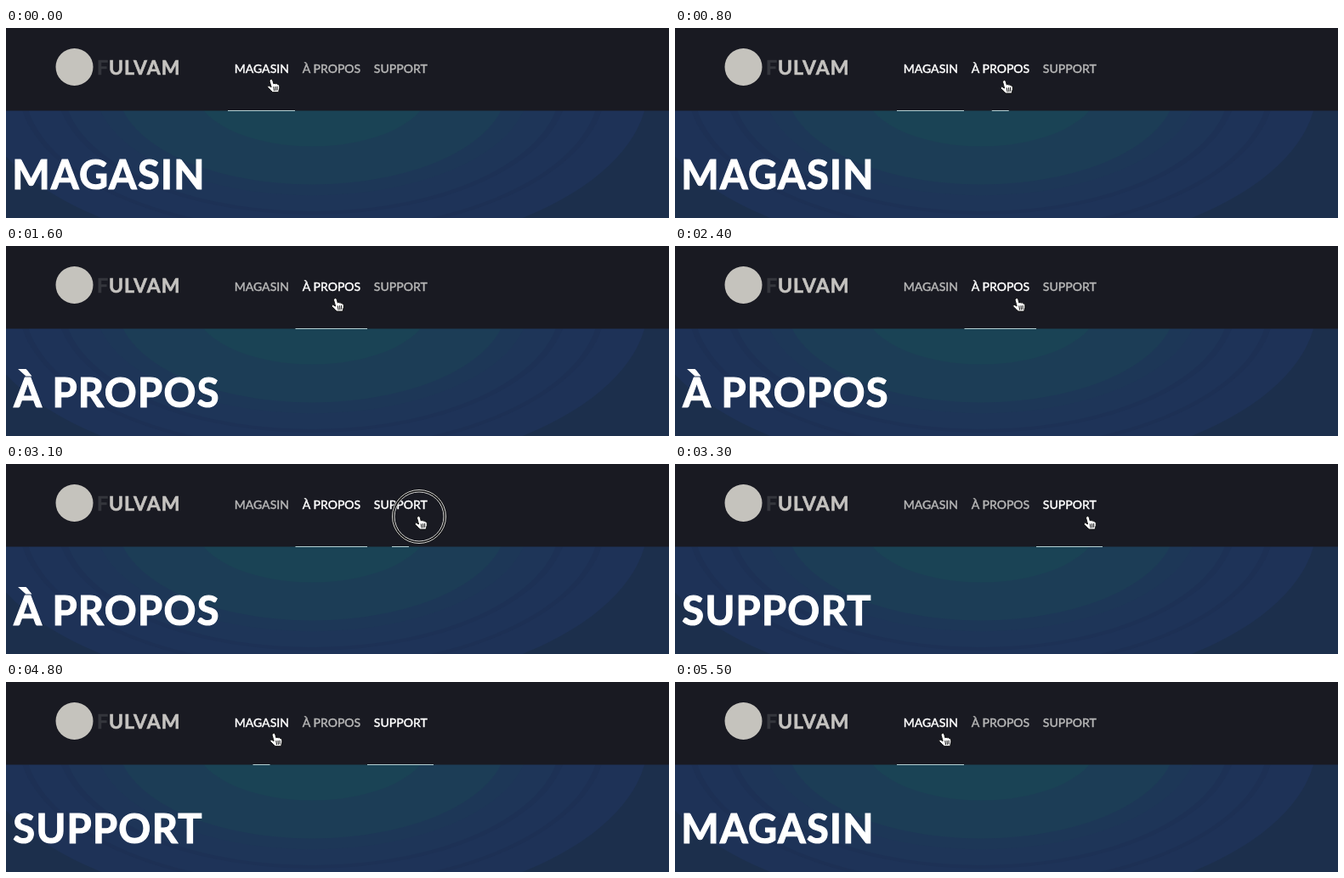
An HTML page that plays this animation: 780 by 224 pixels, repeating every 7 s.

```html
<!DOCTYPE html>
<html lang="fr">
<head>
<meta charset="utf-8">
<title>Navigation</title>
<style>
html, body { margin: 0; width: 100%; height: 100%; overflow: hidden; background: #191a22; }
svg { display: block; width: 780px; height: 224px; font-family: Lato, "Open Sans", sans-serif; }
.brand { font-size: 23px; font-weight: 700; letter-spacing: 1px; stroke-width: .6px; }
.tab { font-size: 14px; font-weight: 500; text-anchor: middle; stroke-width: .35px; }
#title { font-size: 47px; font-weight: 700; letter-spacing: 1.3px; fill: #fff; stroke: #fff; stroke-width: 1.2px; }
</style>
</head>
<body>
<svg viewBox="0 0 780 224">
  <rect width="780" height="224" fill="#1c2f4c"/>
  <g id="glow"></g>
  <rect width="780" height="97.5" fill="#191a22"/>
  <circle cx="80.5" cy="46" r="22" fill="#c5c3bd"/>
  <text class="brand" x="107" y="55" fill="#34363c" stroke="#34363c">F</text>
  <text class="brand" x="121" y="55" fill="#c5c3c0" stroke="#c5c3c0">ULVAM</text>
  <g id="tabs"></g>
  <text id="title" y="189.7"></text>
  <g id="ring" fill="none">
    <circle stroke="#111" stroke-width="4"/>
    <circle stroke="#d5d5d5"/>
    <circle stroke="#d5d5d5"/>
  </g>
  <g id="cursor" stroke="#111" stroke-linejoin="round" stroke-linecap="round">
    <path fill="#fff" d="M-2.4 1.2Q-1.9-.9-.2-.5Q1 0 1.4 1.6L2.3 5Q3.6 3.8 4.7 5.1Q6.2 4.3 7 5.8Q8.8 5.4 9.2 7.4Q9.8 10.5 8.6 12.6L8.2 15H1.2L-1 12.8L-4.6 9.4Q-5.4 7.4-3.4 7.3L-.7 8.8Z"/>
    <path fill="none" d="M2.3 8.8L3 13M4.5 8.6L4.9 12.8M6.6 8.4L6.7 12.4"/>
  </g>
</svg>
<script>
const LOOP = 7000, STEP = 100;
const $ = id => document.getElementById(id);

// line: underline width over time as [ms, px]
const tabs = [
  { name: 'MAGASIN', left: 261, width: 79, titleX: 7.3,
    line: [[1400, 79], [1600, 0], [4600, 0], [4800, 20], [5200, 20], [5500, 79]] },
  { name: 'À PROPOS', left: 340.5, width: 84.5, titleX: 9.3,
    line: [[500, 0], [700, 20], [1400, 20], [1600, 84.5], [3100, 84.5], [3300, 0], [4500, 0], [4600, 8], [4700, 0]] },
  { name: 'SUPPORT', left: 425, width: 78, titleX: 8.3,
    line: [[2400, 0], [2600, 20], [3100, 20], [3300, 78], [5200, 78], [5500, 0]] }
];
const moves = [
  { from: 400, to: 800, x: 388, y: 62 },
  { from: 2300, to: 2600, x: 486, y: 62 },
  { from: 4300, to: 4800, x: 315.5, y: 60.7 }
];
const clicks = [
  { at: 1400, length: 200, tab: 1 },
  { at: 3100, length: 200, tab: 2 },
  { at: 5200, length: 300, tab: 0 }
];

function add(parent, tag, attrs) {
  const el = document.createElementNS('http://www.w3.org/2000/svg', tag);
  set(el, attrs);
  return parent.appendChild(el);
}
function set(el, attrs) {
  for (const key in attrs) el.setAttribute(key, attrs[key]);
}

const bands = [[395, '#1e3257'], [345, '#1d3054'], [338, '#1e3358'], [300, '#1d3155'],
  [292, '#1e3558'], [255, '#1d3757'], [229, '#1c3d56'], [139, '#1a4355']];
for (const [rx, fill] of bands)
  add($('glow'), 'ellipse', { cx: 360, cy: 70, rx, ry: rx / 2, fill });

for (const tab of tabs) {
  tab.mid = tab.left + tab.width / 2;
  tab.label = add($('tabs'), 'text', { class: 'tab', x: tab.mid + .3, y: 53 });
  tab.label.textContent = tab.name;
  tab.bar = add($('tabs'), 'rect', { y: 97, height: 1, fill: '#b4d0d4' });
}

const clamp = v => Math.max(0, Math.min(1, v));
const mix = (a, b, p) => a + (b - a) * p;
const ease = p => p < .5 ? 4 * p ** 3 : 1 - 4 * (1 - p) ** 3;

function valueAt(keys, t) {
  let value = keys[0][1];
  for (let i = 1; i < keys.length; i++) {
    const [start, a] = keys[i - 1], [end, b] = keys[i];
    if (t >= start) value = mix(a, b, clamp((t - start) / (end - start)));
  }
  return value;
}

function draw(t) {
  let x = 312.5, y = 60.7, page = tabs[0], radius = 0;
  for (const m of moves) {
    const p = ease(clamp((t - m.from) / (m.to - m.from)));
    x = mix(x, m.x, p);
    y = mix(y, m.y, p);
  }
  for (const c of clicks) {
    const age = t - c.at;
    if (age >= STEP) page = tabs[c.tab];
    if (age >= 0 && age < c.length) radius = 32 * (1 - age / c.length);
  }
  for (const tab of tabs) {
    const width = valueAt(tab.line, t), lit = clamp(width / 20);
    const shade = Math.round(mix(182, 255, lit)), color = `rgb(${shade},${shade},${shade})`;
    set(tab.label, { fill: color, stroke: color });
    set(tab.bar, { x: tab.mid - width / 2, width });
  }
  $('title').textContent = page.name;
  set($('title'), { x: page.titleX });

  const place = { transform: `translate(${x} ${y})` };
  set($('cursor'), place);
  set($('ring'), { ...place, visibility: radius ? 'visible' : 'hidden' });
  [1.5, .5, 3].forEach((inset, i) => set($('ring').children[i], { r: Math.max(0, radius - inset) }));
}

function tick() {
  const t = performance.now() % LOOP;
  draw(Math.floor(t / STEP) * STEP);
  requestAnimationFrame(tick);
}
tick();
</script>
</body>
</html>
```
